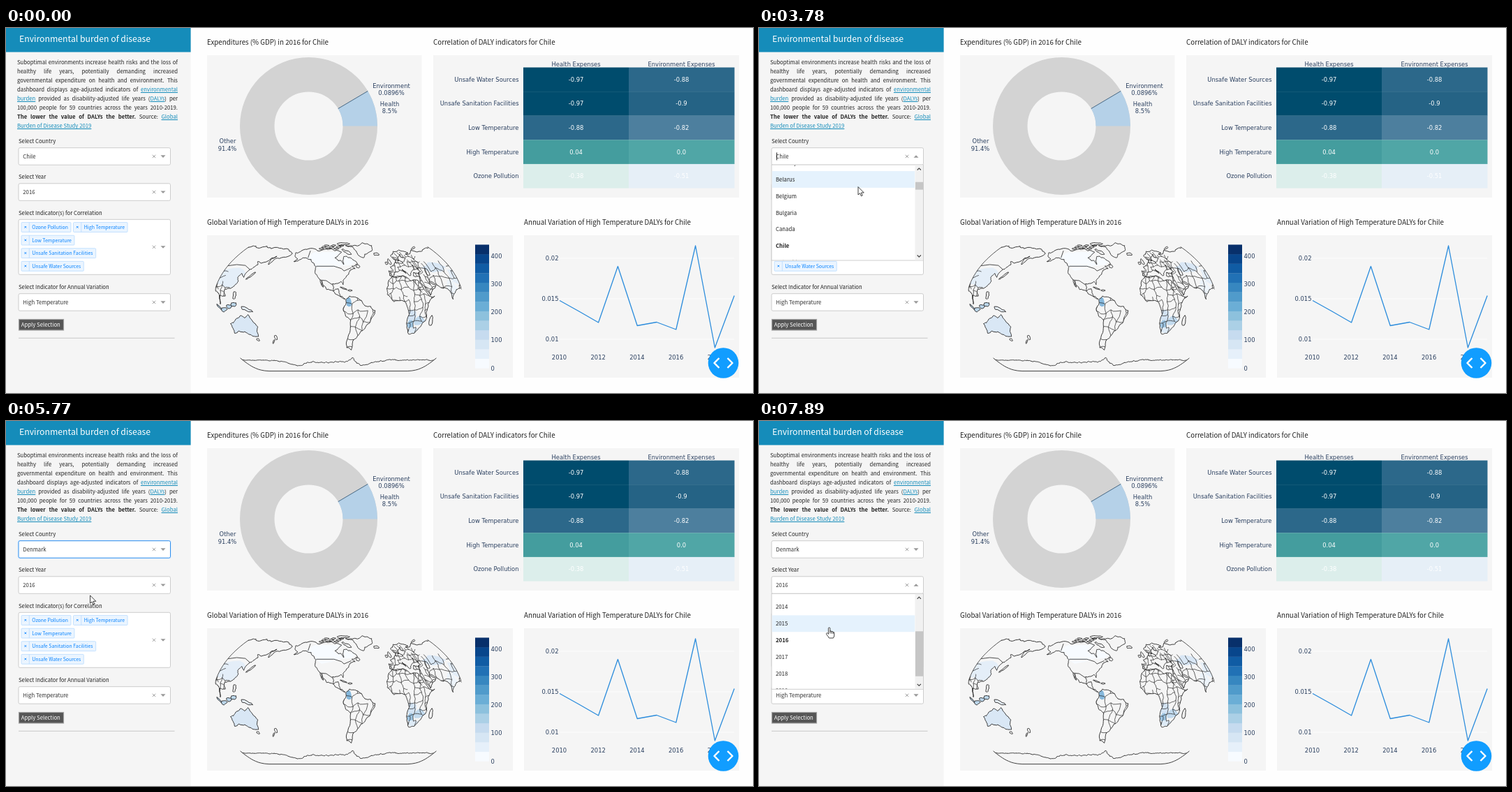
Write an HTML page that moves like this. It is 1070 by 523 pixels and loops after 8 s.

```html
<!DOCTYPE html>
<html lang="en">
<head>
<meta charset="utf-8">
<title>Environmental burden of disease</title>
<style>
  html, body { margin: 0; width: 100%; height: 100%; overflow: hidden; background: #fefefe; }
  svg { display: block; }
  #stage { position: absolute; left: 0; top: 0; }
  .ui, #intro { font-family: "Noto Sans CJK JP", "Noto Sans CJK SC", "Noto Sans CJK", "Open Sans", sans-serif; }
  .plot { font-family: "DejaVu Sans", sans-serif; }
  #intro { position: absolute; left: 16px; top: 41.7px; width: 230px; font-size: 7.75px; line-height: 13.1px; color: #222; }
  #intro span { display: block; height: 13.1px; white-space: nowrap; text-align: justify; text-align-last: justify; }
  #intro span:last-child { text-align-last: left; }
  #intro a { color: #158cba; text-decoration: underline; }
</style>
</head>
<body>
<svg id="stage" width="1070" height="523" viewBox="0 0 1070 523"></svg>
<div id="intro">
  <span>Suboptimal environments increase health risks and the loss of</span>
  <span>healthy life years, potentially demanding increased</span>
  <span>governmental expenditure on health and environment. This</span>
  <span>dashboard displays age-adjusted indicators of <a>environmental</a></span>
  <span><a>burden</a> provided as disability-adjusted life years (<a>DALYs</a>) per</span>
  <span>100,000 people for 59 countries across the years 2010-2019.</span>
  <span><b>The lower the value of DALYs the better.</b> Source: <a>Global</a></span>
  <span><a>Burden of Disease Study 2019</a></span>
</div>
<script>
const stage = document.getElementById('stage');
const LOOP = 8000;
const INK = '#222', NAVY = '#2a3f5f';

function add(parent, tag, attrs, content) {
  const node = document.createElementNS('http://www.w3.org/2000/svg', tag);
  for (const key in attrs) node.setAttribute(key, attrs[key]);
  if (content !== undefined) node.textContent = content;
  parent.appendChild(node);
  return node;
}
const rect = (p, x, y, width, height, fill, more) => add(p, 'rect', { x, y, width, height, fill, ...more });
const path = (p, d, stroke, width, more) =>
  add(p, 'path', { d, fill: 'none', stroke, 'stroke-width': width, 'stroke-linejoin': 'round', ...more });
const ui = (p, x, y, size, fill, s, more) =>
  add(p, 'text', { x, y, fill, 'font-size': size, class: 'ui', ...more }, s);
const plot = (x, y, s, anchor = 'middle', fill = NAVY) =>
  add(stage, 'text', { x, y, fill, 'font-size': 8.4, class: 'plot', 'text-anchor': anchor }, s);
const show = (node, on) => node.setAttribute('visibility', on ? 'inherit' : 'hidden');
const noise = n => { const s = Math.sin(n * 12.9898) * 43758.5453; return s - Math.floor(s) - 0.5; };
const toD = pts => 'M' + pts.map(p => p.map(v => v.toFixed(1)).join(' ')).join('L');

// Page and panels
rect(stage, 0, 0, 264.6, 523, '#f5f5f5');
rect(stage, 0, 0, 264.6, 34.5, '#158cba');
ui(stage, 19, 20, 12.25, '#fff', 'Environmental burden of disease');
function panel(x, y, w, title) {
  rect(stage, x, y, w, 204, '#f5f5f5');
  ui(stage, x, y - 15, 9.75, INK, title);
}
panel(288, 39, 307.5, 'Expenditures (% GDP) in 2016 for Chile');
panel(612, 39, 438, 'Correlation of DALY indicators for Chile');
panel(288, 297, 438, 'Global Variation of High Temperature DALYs in 2016');
panel(742, 297, 308, 'Annual Variation of High Temperature DALYs for Chile');

// Donut
function drawDonut() {
  const cx = 433.5, cy = 140.5, outer = 98.5, inner = 49, a = 0.085 * 2 * Math.PI;
  const pt = r => `${cx + r * Math.cos(a)} ${cy - r * Math.sin(a)}`;
  add(stage, 'circle', { cx, cy, r: (outer + inner) / 2, fill: 'none', stroke: '#d3d3d3', 'stroke-width': outer - inner });
  path(stage, `M${cx + inner} ${cy}H${cx + outer}A${outer} ${outer} 0 0 0 ${pt(outer)}L${pt(inner)}A${inner} ${inner} 0 0 1 ${cx + inner} ${cy}Z`,
    'none', 0, { fill: '#b5d1e8' });
  path(stage, `M${pt(inner)}L${pt(outer)}`, '#123a5c', 0.7);
  plot(552, 85.7, 'Environment'); plot(552, 95.8, '0.0896%');
  plot(549.5, 111.5, 'Health'); plot(549.5, 122, '8.5%');
  plot(317.5, 165, 'Other'); plot(317, 176, '91.4%');
}
drawDonut();

// Heat map
[['Unsafe Water Sources', '-0.97', '#004c6d', '-0.88', '#2c688a'],
 ['Unsafe Sanitation Facilities', '-0.97', '#004c6d', '-0.9', '#256385'],
 ['Low Temperature', '-0.88', '#2c688a', '-0.82', '#4d7f9e'],
 ['High Temperature', '0.04', '#449d9e', '0.0', '#50a6a6'],
 ['Ozone Pollution', '-0.38', '#dceeeb', '-0.51', '#e6eff7']].forEach(([name, a, ca, b, cb], i) => {
  const y = 56.5 + i * 34.6;
  rect(stage, 741, y, 151, 34.7, ca);
  rect(stage, 892, y, 151.5, 34.7, cb);
  plot(734.5, y + 20.3, name, 'end');
  plot(816.5, y + 20.3, a, 'middle', '#fff');
  plot(967.5, y + 20.3, b, 'middle', '#fff');
});
plot(816.5, 54.5, 'Health Expenses');
plot(967.5, 54.5, 'Environment Expenses');

// World map: Natural Earth projection centred on 88 W, coasts bent between key points
const CONTINENTS = {
  northAmerica: '-167,67 -156,71 -128,70 -95,70 -82,68 -94,60 -82,55 -79,51 -78,62 -65,59 -56,52 -66,49 -61,46 -70,43 -76,36 -81,31 -81,26 -84,30 -97,27 -95,18 -88,21 -87,16 -83,10 -78,8 -88,13 -105,20 -113,31 -110,23 -118,34 -124,40 -124,48 -135,58 -150,60 -163,55 -158,58 -165,62 -167,67',
  southAmerica: '-77,8 -72,12 -62,10 -50,0 -35,-6 -39,-14 -48,-27 -57,-36 -65,-43 -66,-55 -74,-52 -73,-38 -70,-18 -76,-14 -81,-5 -77,8',
  greenland: '-73,78 -35,83 -19,78 -24,70 -40,65 -44,60 -53,66 -60,76 -73,78',
  africa: '-6,36 10,37 20,31 32,31 37,21 43,12 51,12 40,-3 40,-15 35,-22 27,-34 19,-35 12,-17 13,-7 9,4 -8,5 -17,14 -17,21 -6,36',
  eurasia: '-9,37 -9,43 -1,44 -4,48 8,54 9,57 20,54 29,60 22,61 24,65 17,61 15,56 7,58 5,62 15,69 28,71 41,67 34,65 68,69 80,73 104,77 113,74 140,73 180,69 188,66 163,59 157,51 156,58 163,62 136,55 140,51 128,40 128,35 122,40 119,35 122,30 117,23 106,20 109,12 100,13 103,2 98,16 91,22 80,15 77,8 72,21 57,26 48,30 56,25 45,13 35,28 36,36 27,37 29,41 41,42 37,46 28,43 22,37 13,45 17,40 10,44 0,41 -5,36 -9,37',
  australia: '114,-22 122,-18 131,-12 136,-15 142,-11 153,-26 149,-38 139,-36 131,-32 115,-34 114,-22'
};
const SHIFTS = [0, -360];

function project([lon, lat]) {
  const f = lat * Math.PI / 180, q = f * f, q2 = q * q, k = 65.8;
  const x = (lon + 88) * Math.PI / 180 * (0.8707 - 0.131979 * q + q2 * (-0.013791 + q2 * (0.003971 * q - 0.001529 * q2)));
  const y = f * (1.007226 + q * (0.015085 + q2 * (-0.044475 + 0.028874 * q - 0.005916 * q2)));
  return [476 + k * x, 398 - k * y];
}
const parse = text => text.split(' ').map(pair => pair.split(',').map(Number));
const geo = pts => SHIFTS.map(s => toD(pts.map(([lon, lat]) => project([lon + s, lat])))).join('');

function roughen(pts, depth = 3) {
  if (!depth) return pts;
  const bent = pts.flatMap(([x, y], i) => {
    if (!i) return [[x, y]];
    const [px, py] = pts[i - 1], n = noise(x * 3.1 + y + depth) * 0.3;
    return [[(x + px) / 2 - (y - py) * n, (y + py) / 2 + (x - px) * n], [x, y]];
  });
  return roughen(bent, depth - 1);
}
function blob(lon, lat, rx, ry, tilt = 0) {
  const pts = Array.from({ length: 9 }, (_, i) => {
    const a = i * Math.PI / 4, r = 1 + noise(lon + lat * 7 + i % 8) * 0.5;
    const x = rx * r * Math.cos(a);
    return [lon + x, lat + ry * r * Math.sin(a) + tilt * x];
  });
  return roughen(pts, 1);
}
function edge(lon, from, to) {
  const pts = [];
  for (let lat = from; lat >= to; lat -= 2) pts.push(project([lon, lat]));
  return pts;
}
const rim = (from, to) => toD([...edge(-268, from, to), ...edge(92, from, to).reverse()]);

// Jittered grid standing in for national borders.
function mesh(parent, west, south, east, north, step) {
  const node = (i, j) => [
    west + (i + noise(i * 7 + j * 3 + west) * 0.8) * step,
    south + (j + noise(i * 5 + j * 11 + north) * 0.8) * step];
  const cols = (east - west) / step, rows = (north - south) / step;
  for (let i = 0; i < cols; i++) for (let j = 0; j < rows; j++) {
    const a = node(i, j);
    const ends = [node(i + 1, j), node(i, j + 1)].filter((_, k) => noise(i * 17 + j * 29 + k * 5 + south) < 0.3);
    for (const b of ends) path(parent, geo(roughen([a, b], 2)), '#222', 0.7);
  }
}

function drawMap() {
  const globe = add(stage, 'clipPath', { id: 'globe' });
  add(globe, 'path', { d: rim(90, -90) + 'Z' });
  const map = add(stage, 'g', { 'clip-path': 'url(#globe)' });
  const land = add(stage, 'clipPath', { id: 'land' });
  const inland = add(map, 'g', { 'clip-path': 'url(#land)' });
  const coast = (pts, fill = 'none') => path(map, geo(pts), '#1a1a1a', 0.85, { fill });

  for (const name in CONTINENTS) {
    const pts = roughen(parse(CONTINENTS[name]));
    add(land, 'path', { d: geo(pts) });
    coast(pts, name === 'australia' ? '#d9e7f5' : 'none');
  }
  const tint = (fill, ...shape) => add(inland, 'path', { d: geo(blob(...shape)), fill });
  tint('#f7fbff', -98, 59, 38, 11);
  tint('#e4eef8', 104, 35, 24, 12);
  tint('#d9e7f5', 67, 48, 18, 6);
  tint('#edf4fb', 79, 22, 8, 11);
  tint('#86b8dc', -73, 4, 4.5, 6);
  tint('#d3e3f3', 18, -12, 7, 6);
  tint('#9fc6e3', 18, -23, 5, 6);
  tint('#c2daee', 31, -19, 8, 6);
  tint('#deebf7', 25, -31, 9, 4);

  mesh(inland, -82, -50, -36, 12, 11);
  mesh(inland, -18, -35, 52, 34, 8);
  mesh(inland, -10, 36, 45, 62, 6);
  mesh(inland, 30, 14, 92, 52, 10);
  mesh(inland, 94, 12, 110, 28, 6);
  for (const line of ['-124,49 -95,49', '-95,49 -83,46 -79,43 -67,47', '-141,70 -141,60', '-117,32 -106,31 -97,26', '87,49 105,51 120,50 131,45'])
    path(inland, geo(parse(line)), '#222', 0.8);

  // Islands: lone ones, then the Arctic and the Sunda chains
  coast(blob(-19, 65, 5, 1.6)); coast(blob(-2, 54, 2.2, 4)); coast(blob(-8, 53, 2, 1.6));
  coast(blob(47, -19, 2.2, 6)); coast(blob(51, 42, 2.5, 5)); coast(blob(-80, 21.5, 5, 0.7, -0.3));
  coast(blob(-71, 19, 3, 1)); coast(blob(-56, 49, 3, 2)); coast(blob(138, 37, 5, 1.5, 0.8));
  coast(blob(175, -39, 2, 3)); coast(blob(170, -44, 3, 1, 0.8)); coast(blob(146.5, -42, 2, 1.5));
  coast(blob(141, -5, 9, 2, -0.3), '#e8f0f9'); coast(blob(122, 13, 2, 5)); coast(blob(60, 74, 7, 1, 0.3));
  coast(blob(-72, 68, 8, 2.5, -0.4)); coast(blob(-78, 81, 12, 2));
  for (let i = 0; i < 9; i++) coast(blob(-122 + i * 5, 73 + (i % 3) * 2.5, 4.5, 1.2));
  for (let i = 0; i < 4; i++) coast(blob(101 + i * 7, i % 2 ? -7.5 + i * 3 : -1, 4, i ? 2.5 : 1, i ? 0 : -1), '#bcd7ec');

  const bump = (lon, at, width) => Math.exp(-(((lon - at) / width) ** 2));
  const ice = [];
  for (let lon = -268; lon <= 92; lon += 9)
    ice.push([lon, -69 - 8 * bump(lon, -170, 22) - 4 * bump(lon, -110, 35) - 8 * bump(lon, -42, 22) + 8 * bump(lon, -60, 7)]);
  coast(roughen(ice));
  for (const lon of [-268, 92]) path(stage, toD(edge(lon, 76, 22)), '#222', 0.75);
  path(stage, rim(-66, -90), '#222', 0.85);
}
drawMap();

// Colour bar
const BLUES = ['#f7fbff', '#deebf7', '#c6dbef', '#9ecae1', '#6baed6', '#4292c6', '#2171b5', '#08519c', '#08306b'];
function blues(v) {
  const p = v * 8, i = Math.min(7, Math.floor(p));
  const mix = [1, 3, 5].map(c => {
    const [a, b] = [BLUES[i], BLUES[i + 1]].map(h => parseInt(h.slice(c, c + 2), 16));
    return Math.round(a + (b - a) * (p - i));
  });
  return `rgb(${mix})`;
}
for (let i = 0; i < 13; i++) rect(stage, 672, 473.9 - i * 13.62, 20, 13.8, blues(i / 12));
for (let i = 0; i < 5; i++) plot(694.5, 490.5 - i * 40.2, i * 100, 'start');

// Line chart
['0.01', '0.015', '0.02'].forEach((s, i) => {
  const y = 446 - i * 58;
  path(stage, `M793 ${y}H1043`, '#fff', 0.8);
  plot(791.5, y + 3, s, 'end');
});
for (let i = 0; i < 5; i++) plot(792.5 + i * 55.7, 474.5, 2010 + i * 2);
const SERIES = [390.5, 406, 422, 341.5, 426.5, 421.5, 432, 312, 458, 383.5];
path(stage, toD(SERIES.map((y, i) => [793 + i * 27.8, y])), '#2b8cdc', 1.3);
add(stage, 'circle', { cx: 1027.5, cy: 480, r: 21.8, fill: '#119dff' });
path(stage, 'M1021.5 473L1014.5 480L1021.5 487M1033.5 473L1040.5 480L1033.5 487', '#fff', 2.4);

// Sidebar form
const cross = (p, x, y, r, color) =>
  path(p, `M${x - r} ${y - r}l${2 * r} ${2 * r}M${x - r} ${y + r}l${2 * r} ${-2 * r}`, color, 0.9);

function select(label, top, value, height = 24.5) {
  const mid = top + height / 2;
  ui(stage, 18, top - 6.5, 7.75, INK, label);
  const ring = rect(stage, 16.5, top - 1.5, 220.5, height + 3, '#e0efff', { rx: 3.5, visibility: 'hidden' });
  const box = rect(stage, 18, top, 217.5, height, '#fff', { rx: 2, stroke: '#c8c8c8', 'stroke-width': 0.9 });
  const text = ui(stage, 24.3, mid + 2.8, 7.75, '#333', value);
  cross(stage, 212, mid, 2.2, '#999');
  const arrow = add(stage, 'path', { fill: '#999' });
  const caret = path(stage, `M25.5 ${mid - 5.5}v11`, '#111', 0.9, { visibility: 'hidden' });
  const point = up => arrow.setAttribute('d', `M221.5 ${mid + (up ? 1.8 : -1.6)}h7l-3.5 ${up ? -3.6 : 3.6}z`);
  point(false);
  return { ring, box, text, caret, point };
}
const country = select('Select Country', 171.7, 'Chile');
const year = select('Select Year', 222.8, '2016');
select('Select Indicator(s) for Correlation', 274.3, '', 79);
select('Select Indicator for Annual Variation', 380.7, 'High Temperature');

// Tags wrap to the next row when they do not fit.
function drawTags(names) {
  let x = 22, y = 278.6;
  for (const name of names) {
    const g = add(stage, 'g', {});
    const box = rect(g, 0, 0, 0, 13.8, '#ebf5ff', { rx: 1, stroke: '#b8dbff', 'stroke-width': 0.8 });
    path(g, 'M11.3 0v13.8', '#b8dbff', 0.8);
    cross(g, 5.8, 6.7, 1.3, '#007eff');
    const w = ui(g, 15.3, 9.4, 6.95, '#0a84ff', name).getComputedTextLength() + 19.3;
    box.setAttribute('width', w);
    if (x + w > 200) { x = 22; y += 18.6; }
    g.setAttribute('transform', `translate(${x} ${y})`);
    x += w + 3.5;
  }
}
drawTags(['Ozone Pollution', 'High Temperature', 'Low Temperature', 'Unsafe Sanitation Facilities', 'Unsafe Water Sources']);
rect(stage, 18.5, 417.5, 64, 15.5, '#555', { stroke: '#a0a0a0', 'stroke-width': 1.2 });
ui(stage, 21.8, 428.4, 7.75, '#fff', 'Apply Selection');
path(stage, 'M18 444.3H241.5', '#c4c4c4', 0.9);

// Option lists
const ROW = 23.85, VIEW = 136;
function menu(top, names, total, chosen) {
  const g = add(stage, 'g', {});
  rect(g, 18, top - 0.5, 217.5, VIEW + 1, '#fff', { stroke: '#c8c8c8', 'stroke-width': 0.9 });
  const view = add(g, 'svg', { x: 18.5, y: top, width: 205, height: VIEW });
  const rows = add(view, 'g', {});
  const band = rect(rows, 0, 0, 205, ROW, '#e5f2fd');
  names.forEach((name, i) => ui(rows, 5.5, i * ROW + 14.8, 7.75, '#222', name,
    { 'font-weight': i === chosen ? 700 : 400 }));
  rect(g, 223.5, top, 11.5, VIEW, '#f1f1f1');
  path(g, `M226.7 ${top + 7}l2.6 -2.6l2.6 2.6M226.7 ${top + VIEW - 7}l2.6 2.6l2.6 -2.6`, '#444', 1.2);
  const track = VIEW - 23;
  const thumb = rect(g, 224, 0, 11, track * VIEW / (total * ROW), '#c6c6c6');
  return {
    rowAt: (y, scroll) => Math.floor((y - top + scroll) / ROW),
    update(open, scroll, hover) {
      show(g, open);
      rows.setAttribute('transform', `translate(0 ${-scroll})`);
      band.setAttribute('y', hover * ROW);
      thumb.setAttribute('y', top + 11.5 + track * scroll / (total * ROW));
    }
  };
}
const COUNTRIES = ['Albania', 'Angola', 'Argentina', 'Armenia', 'Australia', 'Austria', 'Azerbaijan', 'Belarus', 'Belgium',
  'Bulgaria', 'Canada', 'Chile', 'Colombia', 'Costa Rica', 'Croatia', 'Cyprus', 'Denmark', 'El Salvador', 'Estonia',
  'Finland', 'France', 'Georgia'];
const YEARS = Array.from({ length: 10 }, (_, i) => 2010 + i);
const CHILE = COUNTRIES.indexOf('Chile'), Y2016 = YEARS.indexOf(2016);
const countryMenu = menu(196.5, COUNTRIES, 59, CHILE);
const yearMenu = menu(247.8, YEARS, 10, Y2016);

// Pointer
const pointer = add(stage, 'g', {});
const halo = add(pointer, 'circle', { r: 10, cy: -0.5, fill: '#f6ee55' });
const look = { fill: '#fff', 'stroke-linecap': 'round' };
const arrow = path(pointer, 'M0 0V11L2.6 8.7L4.4 12.8L6.2 12L4.4 8H7.9Z', '#111', 0.8, look);
const hand = path(pointer, 'M-1.6 9V1.2Q-1.6 0 -0.4 0T0.8 1.2V5.2Q2.6 4.3 3 5.8Q4.8 5 5.2 6.5Q6.8 6 6.8 7.8V11Q6.8 13 5.4 15H-0.6Q-2 12.6 -4.4 9.6Q-5 8.2 -3.6 7.6Q-2.5 7.8 -1.6 9M0.8 5.2V8M3 5.8V8.3M5.2 6.5V8.7', '#111', 0.8, look);

const within = (t, a, b) => t >= a && t < b;
// Progress from 0 to 1 between two times.
const ramp = (t, a, b) => Math.max(0, Math.min(1, (t - a) / (b - a)));

// Each stroke moves the pointer to a place during a time span.
const STROKES = [
  { from: 1240, to: 2020, x: 173, y: 229 },
  { from: 2020, to: 2440, x: 150, y: 185 },
  { from: 3300, to: 3440, x: 142, y: 228 },
  { from: 4000, to: 4750, x: 129, y: 258 },
  { from: 5640, to: 5980, x: 107, y: 238 },
  { from: 6440, to: 6850, x: 97, y: 290 },
  { from: 7270, to: 7890, x: 101, y: 296 }
];
function pointerAt(t) {
  let x = 282, y = 514;
  for (const s of STROKES) {
    const u = ramp(t, s.from, s.to);
    x += (s.x - x) * u;
    y += (s.y - y) * u;
  }
  return [x, y];
}

const openCountry = 2580, pick = 5290, openYear = 6110, BLINK = 500;
const clicks = [2500, 5220, 6040];

function render(t) {
  const [x, y] = pointerAt(t);
  const countryOpen = within(t, openCountry, pick), yearOpen = t >= openYear, ring = within(t, pick, openYear);

  // A chosen row starts at the bottom edge of its list.
  const bottom = row => (row + 1) * ROW - VIEW;
  const cs = bottom(CHILE) + 8 * ramp(t, 3640, 3780) + 181 * ramp(t, 3780, 4700);
  countryMenu.update(countryOpen, cs, t < 3300 ? CHILE : Math.max(6, countryMenu.rowAt(y, cs)));
  const ys = bottom(Y2016) - 7.7 * ramp(t, 6700, 6850) + 65.4 * ramp(t, 6850, 7700);
  yearMenu.update(yearOpen, ys, t < 6440 ? Y2016 : t < 6920 ? 1 : yearMenu.rowAt(y, ys));

  country.text.textContent = t < pick ? 'Chile' : 'Denmark';
  country.point(countryOpen);
  year.point(yearOpen);
  show(country.ring, ring);
  country.box.setAttribute('stroke', ring ? '#1a82e8' : '#c8c8c8');
  show(country.caret, countryOpen && (t - 2540) % (2 * BLINK) < BLINK);
  show(year.caret, yearOpen && (t - openYear) % (2 * BLINK) < BLINK);

  const isHand = within(t, 4470, pick) || t >= 6440;
  show(pointer, t >= 1240);
  pointer.setAttribute('transform', `translate(${x} ${y})`);
  show(arrow, !isHand);
  show(hand, isHand);
  show(halo, clicks.some(c => within(t, c, c + 140)));
}

const start = performance.now();
function tick() {
  render((performance.now() - start) % LOOP);
  requestAnimationFrame(tick);
}
tick();
</script>
</body>
</html>
```
